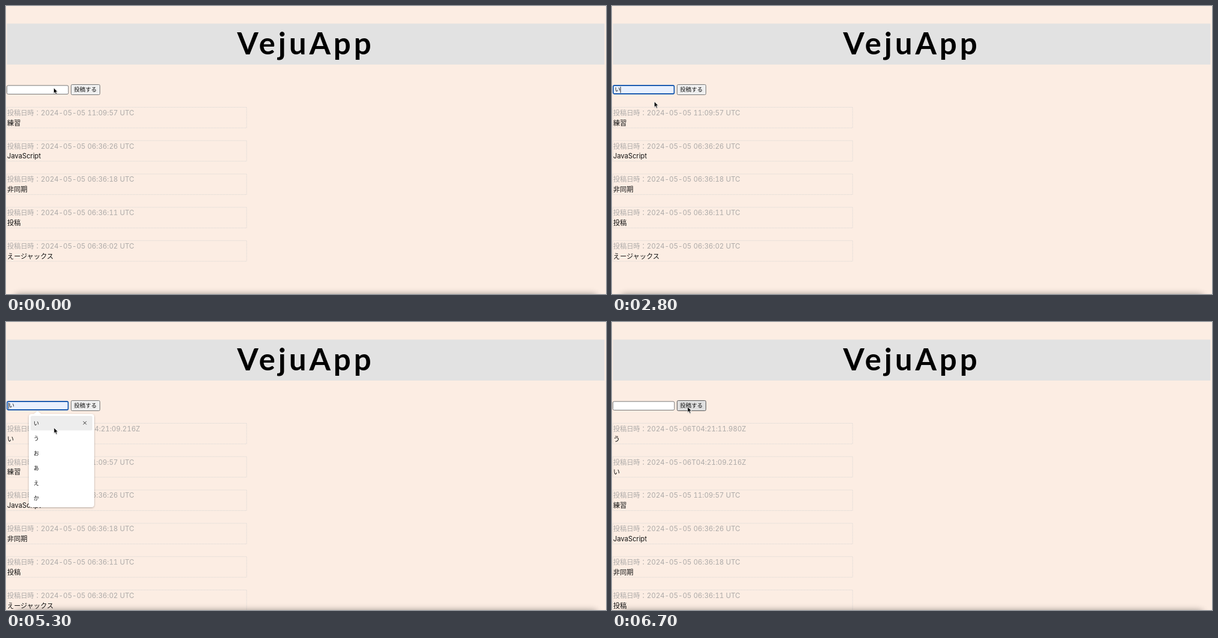
Animation, 1000 px wide and 482 px high, one loop 7200 ms. Source, as an HTML page:

```html
<!DOCTYPE html>
<html lang="ja">
<head>
<meta charset="utf-8">
<title>VejuApp</title>
<style>
  html, body { margin: 0; width: 100%; height: 100%; overflow: hidden; background: #fcede3; }
  svg { display: block; width: 100%; height: 100%; }
  text { font-family: Inter, "Noto Sans CJK JP", "Noto Sans CJK", sans-serif; font-feature-settings: "tnum", "calt" 0; fill: #111; }
  .title { font: 700 51px Lato, sans-serif; letter-spacing: 5px; text-anchor: middle; fill: #000; }
  .label { font-size: 11.2px; fill: #adaaa8; }
  .stamp { font-size: 11.5px; fill: #adaaa8; }
  .body { font-size: 11.2px; }
  .field { font-size: 9.5px; }
  .item { font-size: 9px; font-weight: 500; }
  .post rect { fill: none; stroke: #dfdad6; stroke-dasharray: 1.6 .9; }
</style>
</head>
<body>
<svg id="stage" viewBox="0 0 1000 482">
  <defs>
    <filter id="dock" x="-10%" y="-100%" width="120%" height="300%"><feGaussianBlur stdDeviation="6"/></filter>
    <filter id="soft" x="-20%" y="-20%" width="140%" height="140%">
      <feDropShadow dx="0" dy="1" stdDeviation="1.5" flood-opacity=".3"/>
    </filter>
    <filter id="lift" x="-50%" y="-50%" width="200%" height="200%">
      <feDropShadow dx="0" dy=".7" stdDeviation=".7" flood-opacity=".35"/>
    </filter>
  </defs>
  <rect width="1000" height="482" fill="#fcede3"/>
  <rect x="1.5" y="29.5" width="996" height="68.5" fill="#e2e2e2"/>
  <text class="title" x="499.5" y="81">VejuApp</text>
  <g id="posts"></g>
  <rect x="14" y="483" width="972" height="30" rx="8" opacity=".42" filter="url(#dock)"/>

  <rect id="input" rx="2"/>
  <text id="value" class="field" x="4.5" y="143.4"></text>
  <rect id="caret" y="135" width=".8" height="10.5"/>
  <rect id="button" x="108.5" y="131.5" width="48" height="17" rx="2"/>
  <text class="field" x="113.2" y="143.4">投稿する</text>

  <g id="popup">
    <path d="M43 154H46.5L52.5 148.8L58.5 154H142Q147 154 147 159V305Q147 310 142 310H43Q38 310 38 305V159Q38 154 43 154Z" fill="#fff" filter="url(#soft)"/>
    <g id="hover">
      <rect x="41" y="157" width="103" height="24.5" rx="2.5" fill="#ededed"/>
      <path d="M128.7 166.2l5.4 5.4m0-5.4l-5.4 5.4" stroke="#333" stroke-width="1"/>
    </g>
    <g id="items"></g>
  </g>

  <g id="arrow" filter="url(#lift)">
    <path d="M0 0V9.2L2.1 7.3L3.6 10.7L5.2 10L3.8 6.7H6.6Z" fill="#000" stroke="#fff" stroke-width=".7"/>
  </g>
  <path id="beam" d="M-2.2-5Q0-5 0-3.6Q0-5 2.2-5M0-3.6V3.8M-2.2 5.2Q0 5.2 0 3.8Q0 5.2 2.2 5.2M-1.2 1.8H1.2" fill="none" stroke="#222" stroke-width="1"/>
</svg>
<script>
const LOOP = 7200, STEP = 100, ROW = 25.1, PITCH = 55.8;
const $ = id => document.getElementById(id);
const items = ['い', 'う', 'お', 'あ', 'え', 'か'];

// newest first: [time shown from, timestamp, message]
const posts = [
  [6700, '2024-05-06T04:21:11.980Z', 'う'],
  [4000, '2024-05-06T04:21:09.216Z', 'い'],
  [0, '2024-05-05 11:09:57 UTC', '練習'],
  [0, '2024-05-05 06:36:26 UTC', 'JavaScript'],
  [0, '2024-05-05 06:36:18 UTC', '非同期'],
  [0, '2024-05-05 06:36:11 UTC', '投稿'],
  [0, '2024-05-05 06:36:02 UTC', 'えージャックス']
];

// pointer stops: [time, x, y]
const path = [
  [0, 79.5, 137], [600, 79.5, 137], [800, 71, 140], [1400, 71, 140],
  [2000, 70.5, 160], [2800, 70.5, 160], [3500, 126, 142], [4200, 126, 142],
  [4500, 77, 144.5], [5000, 77, 144.5], [5300, 80, 177], [5500, 81.5, 186],
  [5700, 81.5, 186], [6400, 126, 142], [LOOP, 126, 142]
];

$('posts').innerHTML = posts.map(([, stamp, body]) => `<g class="post">
  <rect x="1.5" y=".5" width="399.5" height="34.5"/>
  <text class="label" x="2" y="13.8">投稿日時：</text>
  <text class="stamp" x="58" y="13.8">${stamp}</text>
  <text class="body" x="2" y="30.6">${body}</text></g>`).join('');
$('items').innerHTML = items.map((s, i) =>
  `<text class="item" x="46" y="${172.5 + i * ROW}">${s}</text>`).join('');
const rows = [...$('posts').children];

const within = (t, a, b) => t >= a && t < b;
const show = (el, on) => el.setAttribute('visibility', on ? 'inherit' : 'hidden');
const set = (el, attrs) => { for (const k in attrs) el.setAttribute(k, attrs[k]); };
const move = (el, x, y) => el.setAttribute('transform', `translate(${x} ${y})`);

function pointer(t) {
  const i = path.findIndex(p => p[0] > t);
  const [t0, x0, y0] = path[i - 1], [t1, x1, y1] = path[i];
  const u = (t - t0) / (t1 - t0), e = u * u * (3 - 2 * u);
  return [x0 + (x1 - x0) * e, y0 + (y1 - y0) * e];
}

function drawField(t, preview) {
  const focus = within(t, 800, 3600) || within(t, 4900, 6400);
  const value = preview || (within(t, 2800, 4000) ? 'い' : within(t, 5700, 6700) ? 'う' : '');
  const since = [5700, 4900, 2800, 800].find(s => t >= s);
  $('value').textContent = value;
  set($('input'), focus
    ? { x: 2, y: 133, width: 101.6, height: 14, stroke: '#1c5cb0', 'stroke-width': 1.8 }
    : { x: 1.5, y: 133, width: 102.5, height: 14.5, stroke: '#777', 'stroke-width': 1 });
  set($('input'), { fill: value ? '#e8f0fe' : '#fff' });
  set($('caret'), { x: value && !preview ? 13.8 : 4.2 });
  show($('caret'), focus && (t - since) % 1000 < 500);
}

function draw(t) {
  const [x, y] = pointer(t);
  const open = within(t, 1200, 2800) || within(t, 5000, 5700);
  const row = open ? Math.floor((y - 156.5) / ROW) : -1;

  let n = 0;
  posts.forEach(([from], i) => {
    show(rows[i], t >= from);
    if (t >= from) move(rows[i], 0, 169 + PITCH * n++);
  });

  drawField(t, row >= 0 ? items[row] : '');
  const over = x > 108 && y > 131 && y < 149;
  set($('button'), { fill: over ? '#dfdfdf' : '#efefef', stroke: over ? '#5a5a5a' : '#777' });

  show($('popup'), open);
  show($('hover'), row >= 0);
  if (row >= 0) move($('hover'), 0, row * ROW);

  const beam = t >= 700 && x < 105 && y > 132 && y < 148;
  show($('beam'), beam);
  show($('arrow'), !beam);
  move(beam ? $('beam') : $('arrow'), x, y);
}

let start, last = -1;
function tick(now) {
  start ??= now;
  const t = Math.floor((now - start) % LOOP / STEP) * STEP;
  if (t !== last) draw(last = t);
  requestAnimationFrame(tick);
}
draw(0);
requestAnimationFrame(tick);
</script>
</body>
</html>
```
